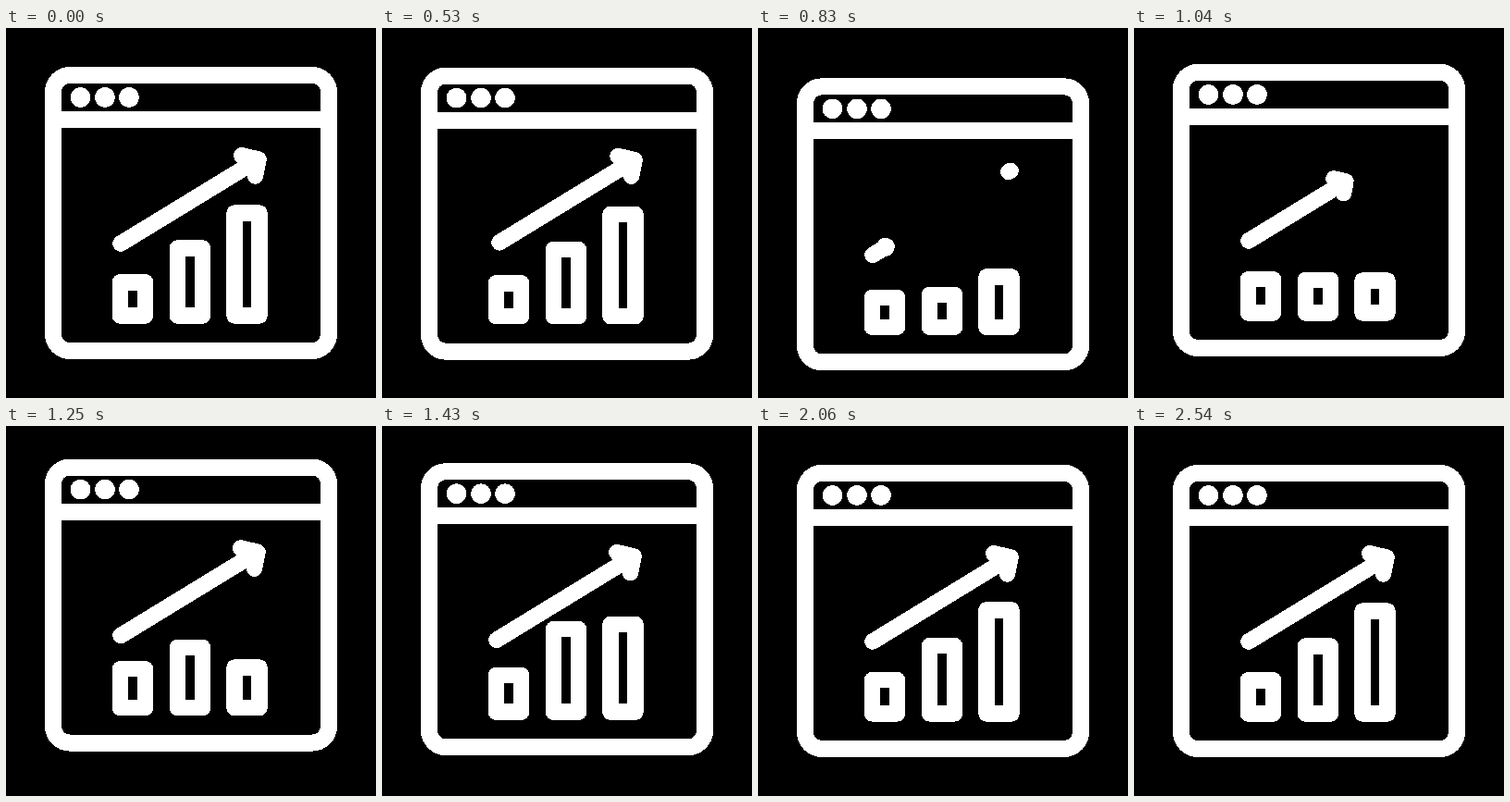
Animation, 400 px wide and 400 px high, one loop 2.63 s. Source, as an HTML page:

```html
<!DOCTYPE html>
<html lang="en">
<head>
<meta charset="utf-8">
<title>Growth chart</title>
<style>
  html, body { margin: 0; width: 100%; height: 100%; overflow: hidden; background: #000; }
  svg { display: block; width: 100%; height: 100%; shape-rendering: crispEdges; }
  .line { fill: none; stroke: #fff; stroke-width: 17.5; stroke-linecap: round; stroke-linejoin: round; }
  .frame { fill: none; stroke: #fff; stroke-width: 18; }
  .dot { fill: #fff; }
</style>
</head>
<body>
<svg viewBox="0 0 400 400">
  <g id="icon">
    <rect class="frame" x="51" y="51" width="298" height="298" rx="18"/>
    <path class="frame" d="M51 99H349"/>
    <circle class="dot" cx="80.5" cy="75" r="10.8"/>
    <circle class="dot" cx="107" cy="75" r="10.8"/>
    <circle class="dot" cx="133" cy="75" r="10.8"/>
    <path class="line bar"/>
    <path class="line bar"/>
    <path class="line bar"/>
    <path class="line" id="oldArrow"/>
    <path class="line" id="newArrow"/>
  </g>
</svg>
<script>
  const LOOP = 2630, START = 500, FIRST = 530, LAST = 2540, STEP = 30;
  const FLOOR = 311;
  const TAIL = [124, 233], TIP = [273, 142];

  // Move to low by lowAt, wait until growAt, overshoot to peak at peakAt, settle on rest.
  const bars = [
    { x: 123.5, rest: 36.2, low: 32, lowAt: 667, growAt: 833, peak: 42.2, peakAt: 1297, tail: 158 },
    { x: 185.5, rest: 73, low: 35, lowAt: 833, growAt: 1010, peak: 90.5, peakAt: 1464, tail: 158 },
    { x: 247, rest: 111, low: 35, lowAt: 993, growAt: 1167, peak: 135, peakAt: 1631, tail: 158 }
  ];
  const bounce = { rest: 0, low: 15, lowAt: 740, growAt: 740, peak: -7.2, peakAt: 1155, tail: 190 };

  const icon = document.getElementById('icon');
  const barPaths = document.querySelectorAll('.bar');
  const oldArrow = document.getElementById('oldArrow');
  const newArrow = document.getElementById('newArrow');

  const mix = (a, b, k) => a + (b - a) * k;

  function ease(t, from, to) {
    const k = Math.min(1, Math.max(0, (t - from) / (to - from)));
    return k * k * (3 - 2 * k);
  }

  function spring(t, m) {
    if (t < START || t >= LAST) return m.rest;
    if (t < m.growAt) return mix(m.rest, m.low, ease(t, START, m.lowAt));
    if (t < m.peakAt) return mix(m.low, m.peak, ease(t, m.growAt, m.peakAt));
    return m.rest + (m.peak - m.rest) / (1 + ((t - m.peakAt) / m.tail) ** 3);
  }

  const along = k => [mix(TAIL[0], TIP[0], k), mix(TAIL[1], TIP[1], k)];

  // The head grows with its own scale while the shaft covers part of the way.
  function arrow(from, to, scale) {
    const [x, y] = along(to);
    return `M${along(from)}L${x} ${y}` +
      `M${x - 18.3 * scale} ${y - 4.2 * scale}L${x} ${y}L${x - 3.5 * scale} ${y + 18 * scale}`;
  }

  function draw(t) {
    icon.setAttribute('transform', `translate(0 ${spring(t, bounce)})`);
    bars.forEach((bar, i) => {
      const h = spring(t, bar);
      barPaths[i].setAttribute('d', `M${bar.x} ${FLOOR}v${-h}h27v${h}z`);
    });
    const gone = ease(t, START, 855);
    const grown = 0.993 * ease(t, 737, 1208) + 0.007 * ease(t, 1400, 1670);
    oldArrow.setAttribute('d', gone < 1 ? arrow(gone, 1, 1 - gone) : '');
    newArrow.setAttribute('d', grown > 0 ? arrow(0, grown, grown) : '');
  }

  function tick() {
    const t = performance.now() % LOOP;
    draw(t < FIRST ? 0 : FIRST + Math.floor((t - FIRST) / STEP) * STEP);
    requestAnimationFrame(tick);
  }
  tick();
</script>
</body>
</html>
```
